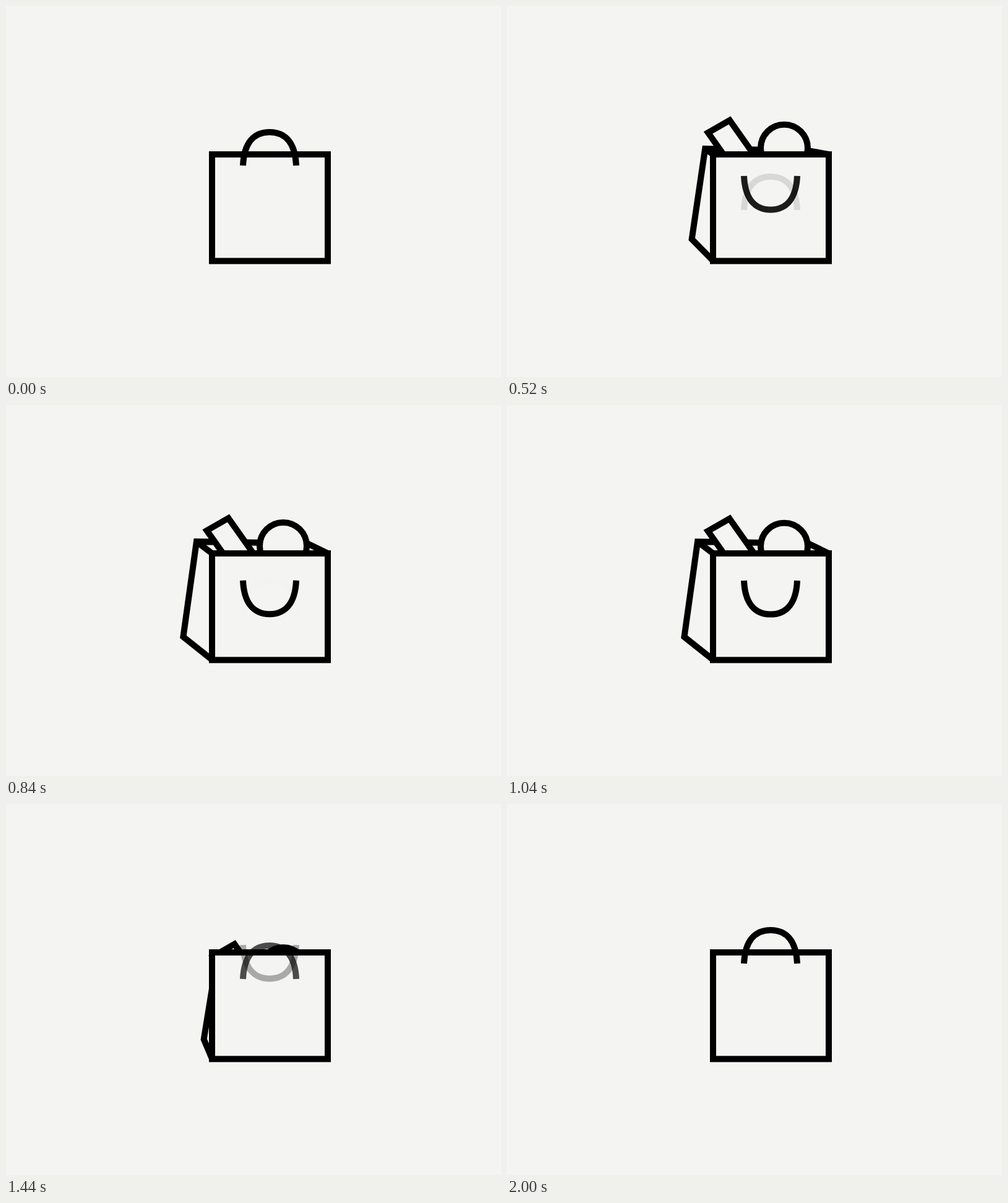
An HTML page that plays this animation: 800x600 px, repeating every 2.02 s.

```html
<!DOCTYPE html>
<html lang="en">
<head>
<meta charset="utf-8">
<title>Shopping bag</title>
<style>
  html, body { margin: 0; width: 100%; height: 100%; overflow: hidden; background: #f4f4f2; }
  svg { display: block; width: 100vw; height: 100vh; }
  .ink { fill: #f4f4f2; stroke: #000; stroke-width: 10; stroke-miterlimit: 10; }
  .line { fill: none; }
</style>
</head>
<body>
<svg viewBox="0 0 800 600">
  <g class="ink">
    <path id="side"/>
    <path id="box" d="M395.3 303.6 L324.7 203.6 L359.6 183.6 L430.2 283.6"/>
    <circle id="ball" cx="448" cy="228.5" r="38"/>
    <rect x="333" y="240" width="187" height="172.4"/>
    <path id="handleUp" class="line" d="M383 258 C384.5 222 400 204 426 204 S467.5 222 469 258"/>
    <path id="handleDown" class="line" d="M383 203 C384.5 239 400 257.5 426 257.5 S467.5 239 469 203"/>
  </g>
</svg>
<script>
const LOOP = 2020, STEP = 20;
const OPEN_AT = 447, CLOSE_AT = 1350, CLOSE_TIME = 530;
const [side, box, ball, handleUp, handleDown] =
  ['side', 'box', 'ball', 'handleUp', 'handleDown'].map(id => document.getElementById(id));

const expoOut = x => x >= 1 ? 1 : 1 - 2 ** (-10 * x);
const elasticOut = (x, period) =>
  x >= 1 ? 1 : 1 - 2 ** (-10 * x) * Math.cos(2 * Math.PI * x / period);

// Openness of a part: 0 is closed, 1 is open.
function openness(t, duration, period) {
  if (t < OPEN_AT) return 0;
  if (t < CLOSE_AT) return elasticOut((t - OPEN_AT) / duration, period);
  return 1 - expoOut((t - CLOSE_AT) / CLOSE_TIME);
}

const move = (el, x, y) => el.setAttribute('transform', `translate(${x} ${y})`);

function drawSide(p) {
  const q = 1 - p;
  const top = `${308 + 48 * q} ${221 + 39 * q}`;
  const bottom = `${286.5 + 48 * q} ${375 + 8 * q}`;
  side.setAttribute('d',
    `M520 240 L487 ${224 + 39 * q} L${top} L${bottom} L333 412 M${top} L333 240`);
}

function drawHandles(p) {
  move(handleUp, 0, 81 * p);
  move(handleDown, 0, 81 * p);
  const fade = Math.min(1, Math.max(0, p));
  handleUp.setAttribute('opacity', 1 - fade);
  handleDown.setAttribute('opacity', fade);
}

function render(t) {
  const goods = 1 - openness(t, 750, 0.4);
  drawSide(openness(t, 500, 1.15));
  move(box, 14 * goods, 62 * goods);
  move(ball, 0, 60 * goods);
  drawHandles(openness(t, 500, 0.73));
}

const start = performance.now();
function tick() {
  const t = (performance.now() - start) % LOOP;
  render(Math.floor(t / STEP) * STEP);
  requestAnimationFrame(tick);
}
tick();
</script>
</body>
</html>
```
